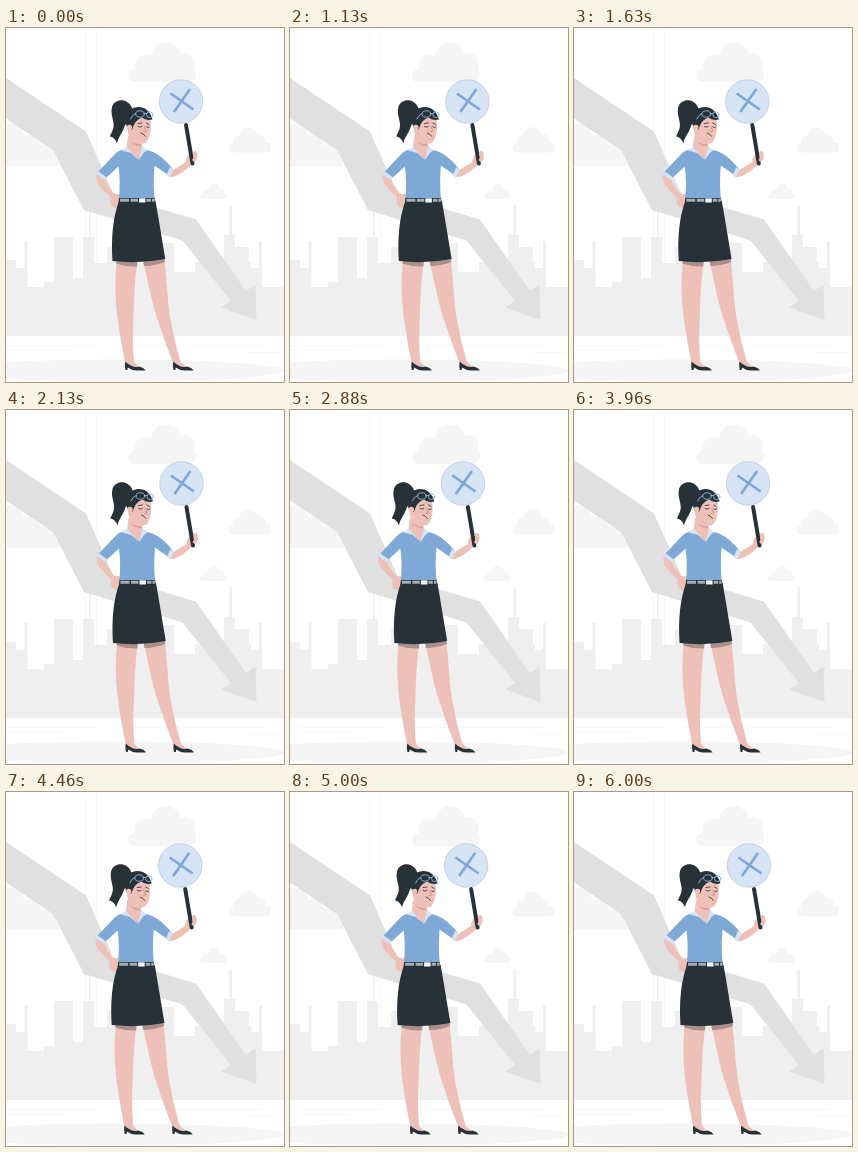
An HTML page that plays this animation: 278x354 px, repeating every 6040 ms.

```html
<!DOCTYPE html>
<html lang="en">
<head>
<meta charset="utf-8">
<title>Falling market</title>
<style>
html, body { margin: 0; width: 100%; height: 100%; overflow: hidden; background: #fff; }
svg { display: block; width: 278px; height: 354px; }
.line { fill: none; stroke-linecap: round; stroke-linejoin: round; }
</style>
</head>
<body>
<svg viewBox="0 0 278 354">
  <!-- backdrop -->
  <path class="line" stroke="#f7f7f7" stroke-width=".8" d="M79.5 0V235M90.5 0V235M0 317.5H93M110 317.5H256M0 322.5H60M242 324.5H278"/>
  <ellipse cx="110" cy="342.5" rx="168" ry="11" fill="#f5f5f5"/>
  <path fill="#f5f5f5" d="M0 97C7 93 17 99 18 108C26 105 33 110 34 117C44 115 51 122 50 130Q55 133 52 138H0Z"/>
  <path fill="#efefef" d="M0 308V232H10V240H18.500V213H21.500V259H38V254H48V209H67V250H77V209H83V183H84.500V209H88V235H101V219H120V210H150V215H168V244H189V234H218V207H223.500V177H226V207H229V219H243V234H245V240H253V213H256V259H278V308Z"/>
  <g fill="#f5f5f5">
    <path d="M128 54C120 54 120 42 129 41C127 31 136 24 145 28C147 11 170 9 175 26C184 23 191 31 188 40C192 45 190 54 183 54Z"/>
    <path d="M227 124.500C221 124 221 116 227 115.500C226 110 229 107 233 108C234 97 249 96 252 107C257 105 260 109 259 114C267 113 267 124.500 260 124.500Z"/>
    <path d="M197 171C193 171 193 165.500 197 165.500C197 162 199 161 202 162C203 154 212 154 214 161C217 160 219 163 218 165C222 165 222 171 218 171Z"/>
  </g>
  <path fill="#e0e0e0" d="M0 50L80 103.500L108 167L190 191.500L240 263L249.500 256.500L250.500 292L215 279.500L225 273L176.500 212.500L78 182L47 122L0 90.500Z"/>

  <g id="woman">
    <!-- legs and shoes -->
    <g fill="#eec1b8">
      <path d="M111 232C108.500 250 109 268 111.500 290Q115 315 119.500 336L124 340H134L128 334Q126 312 127.500 289C128 268 129 250 131.500 232Z"/>
      <path d="M137 232C142 254 145 270 150 287Q158 312 167.500 336L172 340H182L174.500 334Q168 312 164 289C161 268 161 251 158 230Z"/>
    </g>
    <path fill="#ab8f8b" d="M110.500 232L110 235.500Q120 239 131 238.500L131.500 232ZM137 232L138 238Q149 238 159 234L158 230Z"/>
    <g fill="#263238">
      <path id="shoe" d="M119.500 333.500C118.500 336 119 339 119.500 342H121.300L121.800 339.500Q126 342.500 130 342.500H139.500Q138 339.500 133 338.500Q128 340 124 337Q121 335.500 119.500 333.500Z"/>
      <use href="#shoe" x="48"/>
    </g>

    <!-- arms -->
    <path fill="#eec1b8" d="M91 146C89 150 91 155 95 160L105 170C103 174 105 179 109 180Q113 180 114.500 177L115 166Q110 167 107 165L100 155L99 149Z"/>
    <path fill="#eec1b8" d="M163 149L167 142L180 134C180 129 183 125 187 124Q191 121 191.500 127Q192 132 187 135Q178 145 167 149Z"/>
    <path class="line" stroke="#263238" stroke-width="4" d="M180 97L186.500 135.500"/>
    <path fill="#eec1b8" d="M186.500 125Q190 121 191 126Q192 132 188 134L186 132Q188.500 130 186.500 125Z"/>

    <!-- sign -->
    <circle cx="175" cy="73.500" r="21.700" fill="#d6e4f4" stroke="#b8cee8" stroke-width=".9"/>
    <path class="line" stroke="#7ea8d8" stroke-width="2.700" style="stroke-linecap:butt" d="M164.500 65.500L187.500 81.500M184 61L168 84"/>

    <!-- skirt and belt -->
    <path fill="#263238" d="M113 173H149.500C153 192 156 212 159.300 231Q134 236 106.500 233C105 210 107 189 113 173Z"/>
    <path fill="#263238" d="M113 169.500H148.500L149.500 175H112.500Z"/>
    <path fill="#a3afb5" d="M114 170.800H123V173.800H114ZM124.500 170.800H132V173.800H124.500ZM140.500 170.800H145V173.800H140.500ZM146 170.800H148.500V173.800H146Z"/>
    <rect x="133" y="170.300" width="6.500" height="4.200" fill="#f5f5f5"/>

    <!-- shirt -->
    <path fill="#7ea8d5" d="M117 121.500Q112 122.500 108.500 126.500L92 144L100 150L112.500 138.500Q114.500 153 113 170H148.500Q147 155 148.500 137.500L162 147L166.500 140.500Q156 128 147 124Q143 122 138 121.500Z"/>
    <path fill="#d5e3f4" d="M92 143L101 149.500L98.500 152L90 146ZM164 139L167.500 141.500L163.500 149.500L160.500 147Z"/>

    <!-- neck, collar -->
    <path fill="#eec1b8" d="M122 108L120.500 120.500L132.500 131.500L137 121L134 112Z"/>
    <path fill="#dda39c" d="M124 113Q129 117 134.500 115L135.500 118Q128 119 124 113Z"/>
    <path fill="#d5e3f4" d="M120.500 118.500L115.500 122.500L125 125L132.500 132ZM136 118L141 122.500L137.500 125L132.500 132.500Z"/>

    <!-- head -->
    <path fill="#263238" d="M126 80C122 70 109 70 106 79C104 87 108.500 93 107.500 99C106.500 104 104.500 106 104 108.500Q109 109.500 111 115.500C112 109 117 105 119 97L127 90Z"/>
    <path fill="#eec1b8" d="M124 90C120.500 98 121 109 126 113Q132 118 139 115C143.500 112 145.500 104 144.500 91L136 84Z"/>
    <path fill="#263238" d="M121 99C118 90 121 79.500 132 79Q143 79 146.500 91.500Q140 93 136 89.500Q129.500 92 127.500 98Q126.500 102 125 102Q124.500 97 123 97Z"/>
    <circle cx="123.500" cy="99.500" r="2.700" fill="#eec1b8"/>
    <g class="line" stroke="#263238" stroke-width=".8">
      <path d="M132 98.500Q134 100 136 98.500M140.500 99Q142 100.500 143.500 99M132 95.500L136 95M140.500 95L143 96.500M135 105Q137.500 105.500 139.500 108.500"/>
      <path stroke="#c9837c" d="M138.500 98.500L140.500 103L138 103.500"/>
    </g>
    <g class="line" stroke="#8fb9e5" stroke-width=".9">
      <path d="M124.500 91Q126 87 129.500 85.500M138 85.500L140.500 85.500"/>
      <ellipse cx="134" cy="86" rx="4.300" ry="3.200"/>
      <ellipse cx="143.700" cy="86.700" rx="3.200" ry="2.900"/>
    </g>
  </g>
</svg>
<script>
const woman = document.getElementById('woman');
const LOOP = 6040, STEP = 600, REACH = 2.5;
const sway = [0, -1, 1, -1, 1, -1, 1, -1, .8, -.8, 0];
const ease = p => p < .5 ? 2 * p * p : 1 - 2 * (1 - p) ** 2;

function draw(now) {
  const beat = Math.min(now % LOOP / STEP, 9.9999);
  const i = Math.floor(beat);
  const x = REACH * (sway[i] + (sway[i + 1] - sway[i]) * ease(beat - i));
  woman.setAttribute('transform', `translate(${x.toFixed(3)} 0)`);
}

const start = performance.now();
function tick() {
  draw(performance.now() - start);
  requestAnimationFrame(tick);
}
tick();
</script>
</body>
</html>
```
